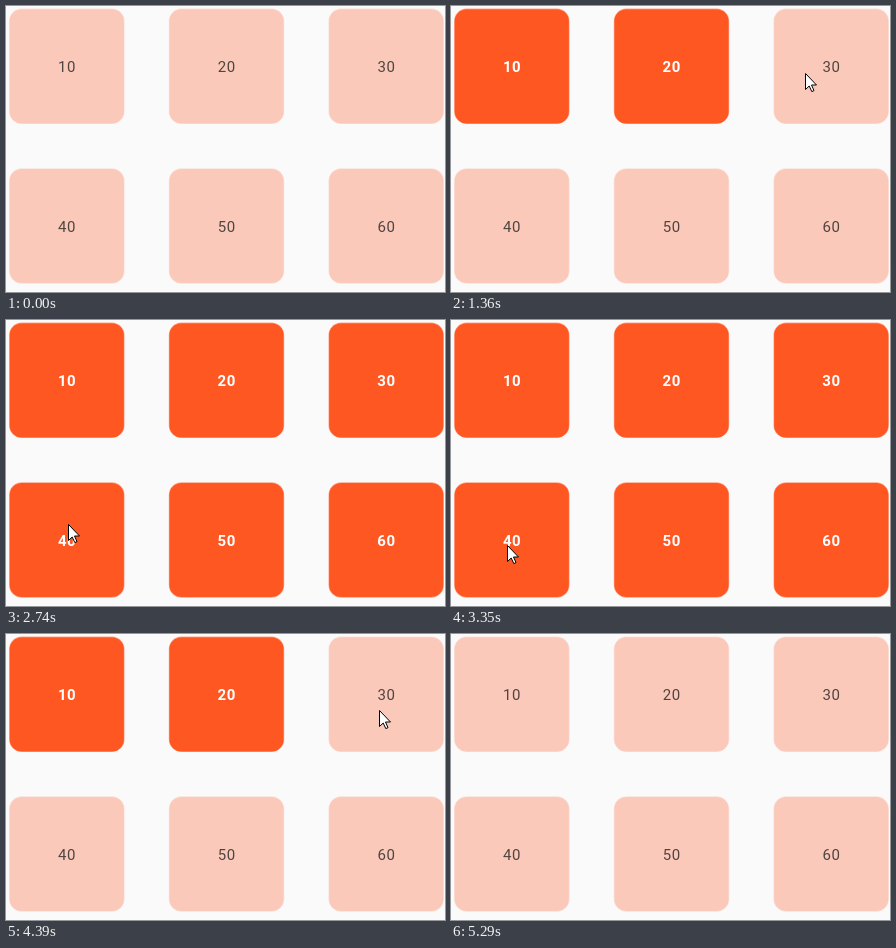
Write an HTML page that moves like this. It is 439 by 286 pixels and loops after 5.69 s.

```html
<!DOCTYPE html>
<html lang="en">
<head>
<meta charset="utf-8">
<title>Slide to select</title>
<style>
  html, body { margin: 0; height: 100%; overflow: hidden; background: #fafafa; }
  svg { display: block; }
  .tile { fill: #fbc9ba; stroke: #fbc9ba; stroke-opacity: .5; stroke-width: 1.2; }
  text { font: 400 15px Roboto, sans-serif; letter-spacing: .6px; text-anchor: middle; fill: #504440; }
  .on .tile { fill: #ff5722; stroke: #ff5722; }
  .on text { font-weight: 700; fill: #fff; }
  #cursor { fill: #fff; stroke: #000; }
</style>
</head>
<body>
<svg width="439" height="286">
  <g id="tiles"></g>
  <path id="cursor" d="M.5 .5V16.5L4.2 13 6.8 18.6 9 17.6 6.5 12H11.5Z"/>
</svg>
<script>
const LOOP = 5690, START = 400, STEP = 68.87, END = 5283;
const COLUMNS = 3, COUNT = 6, PITCH = 159.7;

// Turning points of the pointer: time, x, y
const turns = [
  [400, 36, 62], [1364, 354, 67], [1640, 366, 94], [1984, 326, 216],
  [2742, 62, 204], [2880, 56, 225], [3330, 56, 225], [3706, 310, 218],
  [3843, 373, 220], [4394, 373, 76], [4740, 62, 62], [5221, 335, 282]
];

// Tiles switch on along a snake, row by row, and off again in reverse
const onTime = n => n < COLUMNS ? 450 + 590 * n : 610 + 410 * n;
const offTime = n => 3380 + 290 * (COUNT - 1 - n);

const cursor = document.getElementById('cursor');
const tiles = Array.from({ length: COUNT }, (_, n) => {
  const row = Math.floor(n / COLUMNS);
  const column = row ? COUNT - 1 - n : n;
  const g = document.createElementNS('http://www.w3.org/2000/svg', 'g');
  g.setAttribute('transform', `translate(${60.8 + column * PITCH} ${60.3 + row * PITCH})`);
  g.innerHTML = `<rect class="tile" x="-57.1" y="-57.1" width="114.2" height="114.2" rx="12"/>
    <text x=".3" y="5.7">${(row * COLUMNS + column + 1) * 10}</text>`;
  return document.getElementById('tiles').appendChild(g);
});

function pointerAt(t) {
  const next = turns.findIndex(turn => turn[0] > t);
  const i = next < 0 ? turns.length - 1 : Math.max(next, 1);
  const [t0, x0, y0] = turns[i - 1], [t1, x1, y1] = turns[i];
  const k = Math.min(1, Math.max(0, (t - t0) / (t1 - t0)));
  return [x0 + (x1 - x0) * k, y0 + (y1 - y0) * k].map(Math.round);
}

function draw() {
  const now = performance.now() % LOOP;
  // The motion advances in discrete steps
  const t = START + Math.floor((now - START + 6) / STEP) * STEP;
  tiles.forEach((g, n) => g.classList.toggle('on', t >= onTime(n) && t < offTime(n)));
  cursor.style.display = t >= START && t < END ? '' : 'none';
  cursor.setAttribute('transform', `translate(${pointerAt(t)})`);
  requestAnimationFrame(draw);
}
draw();
</script>
</body>
</html>
```
